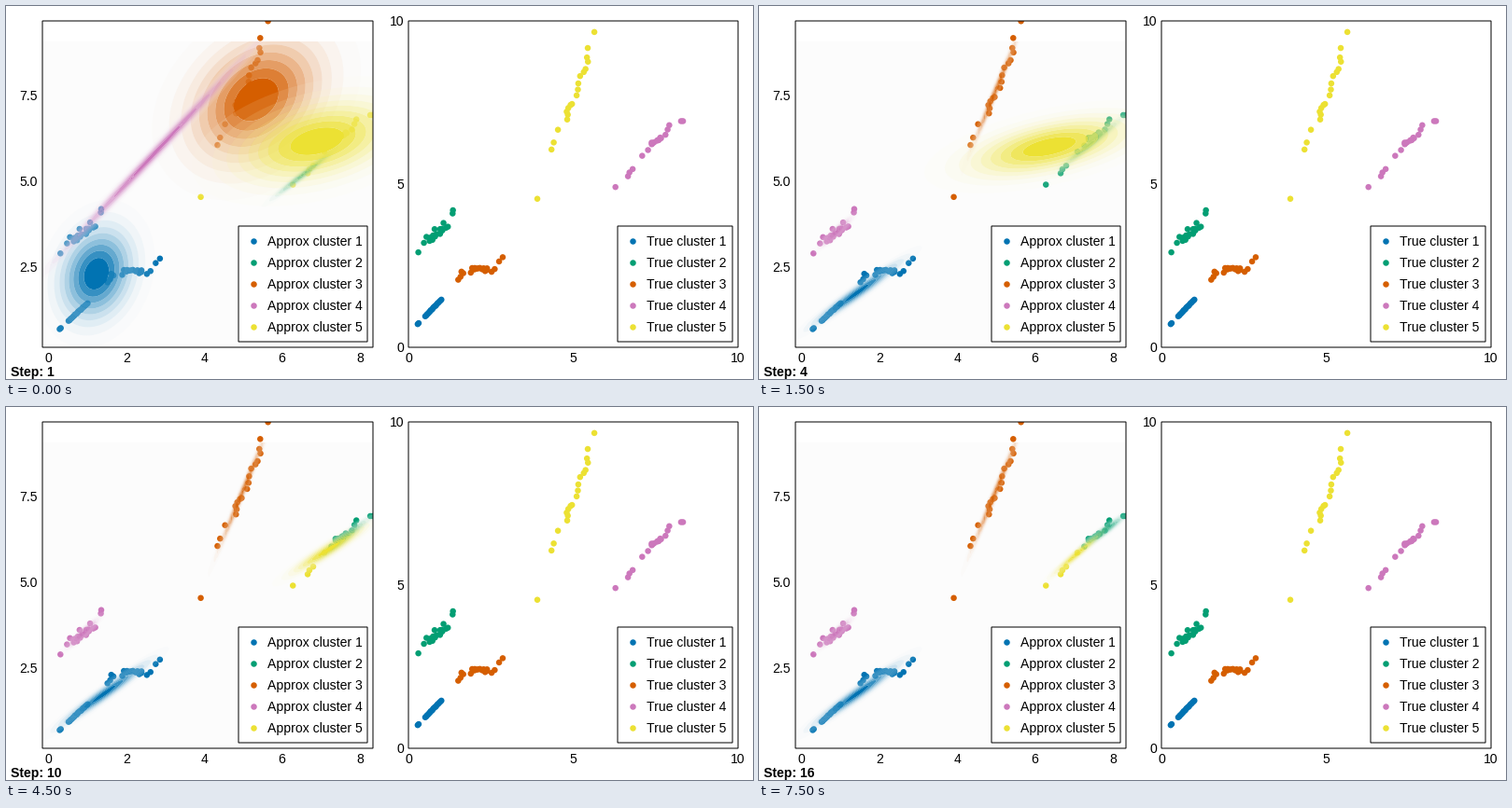
A matplotlib script that plays this animation: 800x400 px, repeating every 8000 ms.

```python
import numpy as np
import matplotlib.pyplot as plt
from matplotlib.animation import FuncAnimation
from matplotlib.colors import to_rgb
from matplotlib.patches import Rectangle

PT = 0.72  # points per pixel at 100 dpi
STEPS = 16
BANDS = 10
SIZE = 20  # samples per cluster
COLORS = ["#0173B2", "#029E73", "#D55E00", "#CC78BC", "#ECE133"]
BLUE, GREEN, ORANGE, PINK, YELLOW = range(5)

plt.rcParams["font.family"] = "Liberation Sans"
rng = np.random.default_rng(4)


def scatter_along(jitter, *path):
    """Samples spread along a path of (rank, x, y), jittered except at the tips."""
    rank, x, y = np.array(path).T
    n = np.arange(SIZE)
    pts = np.column_stack([np.interp(n, rank, x), np.interp(n, rank, y)])
    pts[2:-2] += rng.uniform(-jitter, jitter, (SIZE - 4, 2))
    return pts


c1 = scatter_along(.01, (0, .28, .71), (1, .31, .74), (2, .50, .95), (19, 1.0, 1.46))
c2 = scatter_along(.12, (0, .30, 2.91), (1, .47, 3.20), (6, .80, 3.40),
                   (12, .92, 3.62), (17, 1.10, 3.72), (18, 1.34, 4.10), (19, 1.35, 4.20))
c3 = scatter_along(.11, (0, 1.51, 2.07), (2, 1.65, 2.25), (5, 1.95, 2.38),
                   (17, 2.58, 2.40), (18, 2.75, 2.63), (19, 2.86, 2.76))
c4 = scatter_along(.06, (0, 6.28, 4.91), (1, 6.66, 5.24), (3, 6.75, 5.45),
                   (4, 7.14, 5.91), (6, 7.35, 6.22), (14, 7.68, 6.40),
                   (17, 7.91, 6.79), (18, 8.27, 6.93), (19, 8.33, 6.93))
c5 = scatter_along(.07, (0, 3.91, 4.55), (1, 4.34, 6.06), (3, 4.48, 6.60),
                   (4, 4.77, 7.0), (9, 5.0, 7.45), (14, 5.28, 8.45),
                   (17, 5.44, 8.86), (18, 5.44, 9.17), (19, 5.64, 9.66))
CLUSTERS = [c1, c2, c3, c4, c5]


def settled(step, pts):
    """Key for a component that has converged on the given samples."""
    sx, sy = pts.std(axis=0)
    return (step, *pts.mean(axis=0), sx, sy, np.corrcoef(pts.T)[0, 1])


def fit(*keys):
    """Keys (step, mean x, mean y, sigma x, sigma y, correlation) as a smooth track."""
    k = np.array(keys)
    k[:, 3:5] = np.log(k[:, 3:5])
    k[:, 5] = np.arctanh(k[:, 5])
    return k


FITS = [
    fit((1, 1.226, 2.32, .70, 1.0, .20), (2, 1.32, 2.0, .72, .88, .50),
        settled(4, np.vstack([c1, c3]))),
    fit((1, 6.63, 5.28, .54, .48, .98), (2, 7.36, 5.98, .50, .46, .975),
        (4, 7.45, 6.12, .50, .46, .97), (16, 7.75, 6.47, .38, .33, .95)),
    fit((1, 5.34, 7.38, 1.25, 1.36, .30), (2, 5.07, 7.56, .73, .96, .42),
        settled(4, c5)),
    fit((1, 2.74, 5.84, 1.75, 2.13, .9968), (2, 1.49, 4.40, 1.35, 1.66, .994),
        settled(4, c2)),
    fit((1, 6.9, 6.17, 1.50, .88, .38), (2, 6.85, 6.44, 1.48, .63, .38),
        (4, 6.37, 6.01, 1.50, .63, .55), (8, 7.24, 6.0, .78, .52, .935),
        (16, 7.1, 5.85, .46, .45, .97)),
]


def density(track, step, x, y):
    mx, my, lx, ly, z = (np.interp(step, track[:, 0], col) for col in track.T[1:])
    rho = np.tanh(z)
    u, v = (x - mx) / np.exp(lx), (y - my) / np.exp(ly)
    d = np.exp(-(u * u + v * v - 2 * rho * u * v) / (2 * (1 - rho * rho)))
    return d / d.max()


def owners(step):
    """Component each sample is assigned to."""
    own = np.repeat([BLUE, PINK, BLUE, GREEN, ORANGE], SIZE).reshape(5, SIZE)
    if step == 1:
        own[1], own[3] = BLUE, YELLOW
    if step <= 2:
        own[4, 0] = own[3, -1] = YELLOW
    if step >= 9:
        own[3, c4[:, 0] < 7.25] = YELLOW
    return own.ravel()


def left_px(x, y):
    return 45.8 + 41.63 * x, 372.7 - 36.9 * y


def right_px(x, y):
    return 431 + 35.3 * x, 366 - 35 * y


def band_colors(color):
    """From clear white to the solid colour."""
    t = np.arange(1, BANDS)[:, None] / (BANDS - 1)
    rgb = 1 + (np.array(to_rgb(color)) - 1) * t
    return np.hstack([rgb, t])


fig = plt.figure(figsize=(8, 4), dpi=100, facecolor="white")
ax = fig.add_axes([0, 0, 1, 1])
ax.set(xlim=(0, 800), ylim=(400, 0), autoscale_on=False)
ax.axis("off")


def label(x, y, s, ha="left", **kw):
    return ax.text(x, y + 5, s, size=14 * PT, ha=ha, va="baseline", zorder=12, **kw)


def box(x0, y0, x1, y1, z, fill="none"):
    r = Rectangle((x0, y0), x1 - x0, y1 - y0, fc=fill, ec="black", lw=PT,
                  zorder=z, snap=False)
    return ax.add_patch(r)


def dots(x, y, colors, z):
    return ax.scatter(x, y, s=(6.5 * PT) ** 2, c=colors, linewidths=0, zorder=z)


def legend(x0, x1, word):
    box(x0, 236, x1, 360, 10, "white")
    for k, color in enumerate(COLORS):
        y = 252 + 23 * k
        dots([x0 + 16], [y], [color], 11)
        label(x0 + 31, y, f"{word} cluster {k + 1}")


ax.add_patch(Rectangle((39, 38), 354, 328, fc="#fcfcfc", ec="none", zorder=0))
frame = box(39, 16, 393, 366, 9)
box(431, 16, 784, 366, 9)
legend(249, 387, "Approx")
legend(655, 778, "True")

for v in (0, 2, 4, 6, 8):
    label(left_px(v, 0)[0], 377, str(v), "center")
for v in (2.5, 5.0, 7.5):
    label(34, left_px(0, v)[1], str(v), "right")
for v in (0, 5, 10):
    px, py = right_px(v, v)
    label(px, 377, str(v), "center")
    label(426, py, str(v), "right")
step_text = label(5, 392, "", weight="bold")

samples = np.concatenate(CLUSTERS)
truth = np.repeat(COLORS, SIZE)
dots(*right_px(*samples.T), truth, 3)
approx = dots(*left_px(*samples.T), truth, 3)
approx.set_clip_path(frame)

GX, GY = np.meshgrid(np.linspace(-.163, 8.34, 120), np.linspace(.182, 9.07, 120))
PX, PY = left_px(GX, GY)
LEVELS = np.arange(1, BANDS + 1) / BANDS
LEVELS[-1] = 1.001
palette = np.array([to_rgb(c) for c in COLORS])
contours = []


def update(i):
    step = i + 1
    while contours:
        contours.pop().remove()
    for k, track in enumerate(FITS):
        contours.append(ax.contourf(PX, PY, density(track, step, GX, GY),
                                    levels=LEVELS, colors=band_colors(COLORS[k]),
                                    antialiased=True, zorder=4 + 0.1 * k))
    ax.set(xlim=(0, 800), ylim=(400, 0))
    approx.set_facecolor(palette[owners(step)])
    step_text.set_text(f"Step: {step}")


anim = FuncAnimation(fig, update, frames=STEPS, interval=500, repeat=True,
                     repeat_delay=0, init_func=lambda: None, blit=False)
plt.show()
```
